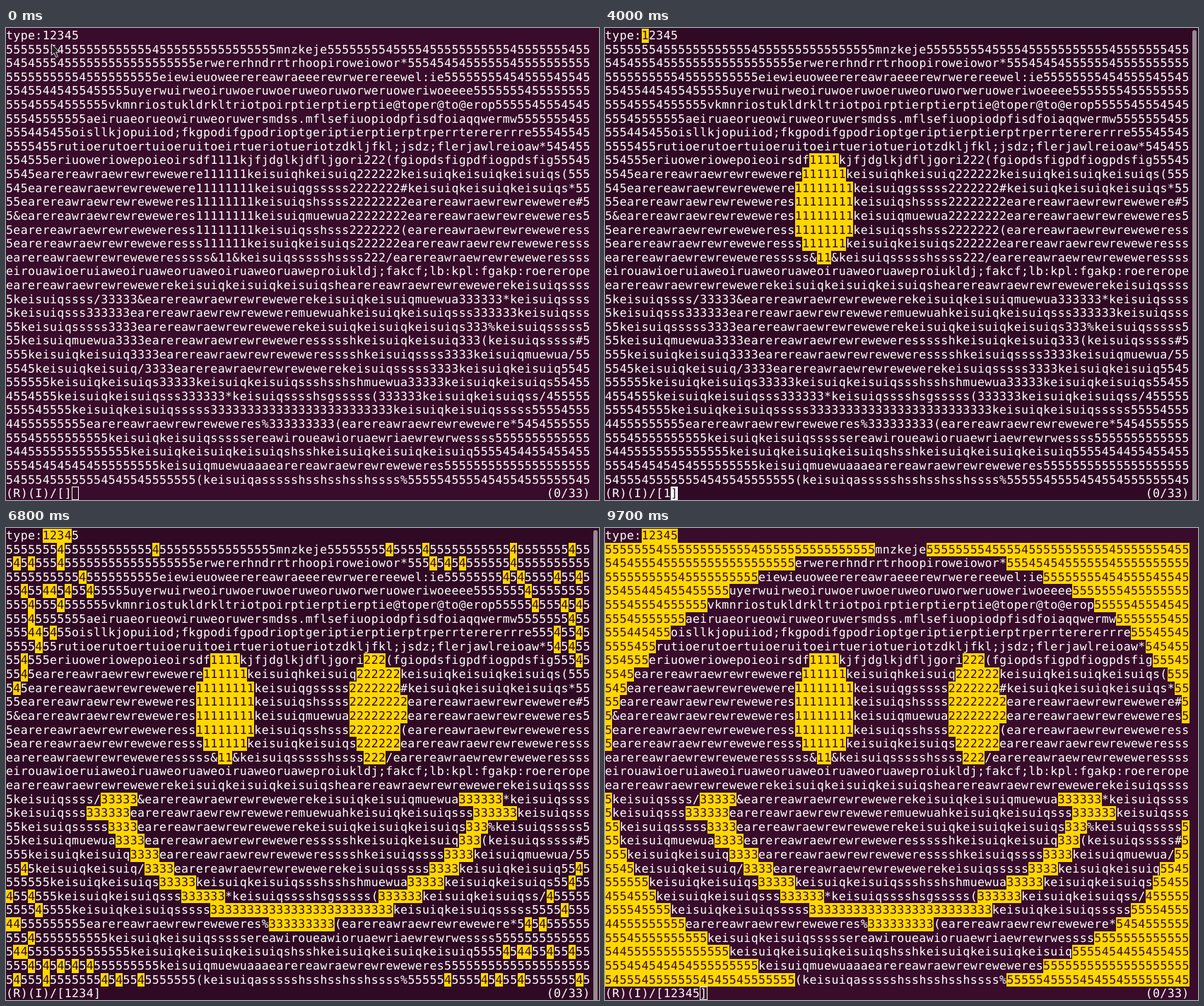
Animation of 839x667 px, one loop 9800 ms. Source, as an HTML page:

```html
<!DOCTYPE html>
<html lang="en">
<head>
<meta charset="utf-8">
<title>Incremental search</title>
<style>
  html, body { margin: 0; height: 100%; overflow: hidden; }
  body { --bg: #300a24; --row: 19.61px; position: relative; background: var(--bg); color: #fff; }
  body.idle { --bg: #380c2a; }
  pre, #cursor {
    position: absolute; margin: 0; top: 1px; left: 0;
    font: 16.53px/var(--row) "DejaVu Sans Mono", monospace;
    letter-spacing: calc(10.333px - 1ch);
    text-rendering: geometricPrecision;
    font-variant-ligatures: none;
  }
  #prompt, #cursor { top: calc(1px + 33 * var(--row)); }
  b { display: inline-block; height: var(--row); vertical-align: top; font-weight: inherit; }
  b.on { background: #ffd700; color: var(--bg); }
  #cursor { width: 10.333px; height: 19px; background: #fff; color: var(--bg); white-space: pre; }
  .idle #cursor { background: none; color: transparent; box-shadow: inset 0 0 0 1px #fff; }
  #bar { position: absolute; left: 831px; top: 3px; width: 6px; height: 670px; border-radius: 3px; background: #958a92; }
  .idle #bar { display: none; }
  #mouse { position: absolute; width: 14px; height: 22px; overflow: visible; }
</style>
</head>
<body>
<pre id="screen"></pre>
<pre id="prompt"></pre>
<div id="cursor"></div>
<div id="bar"></div>
<svg id="mouse"><path d="M.5 .5V16.5L4 13.2L6.6 19.5L9.3 18.3L6.7 12.3H11.6Z" fill="#222" stroke="#ddd"/></svg>
<script>
const text = `type:12345
5555555455555555555545555555555555555mnzkeje555555554555545555555555545555555455
54545554555555555555555555erwererhndrrtrhoopiroweiowor*5554545455555545555555555
555555555545555555555eiewieuoweerereawraeeerewrwerereewel:ie55555555454555545545
55455445455455555uyerwuirweoiruwoeruwoeruweoruworweruoweriwoeeee5555555455555555
55545554555555vkmnriostukldrkltriotpoirptierptierptie@toper@to@erop5555545554545
55545555555aeiruaeorueowiruweoruwersmdss.mflsefiuopiodpfisdfoiaqqwermw5555555455
555445455oisllkjopuiiod;fkgpodifgpodrioptgeriptierptierptrperrterererrre55545545
5555455rutioerutoertuioeruitoeirtueriotueriotzdkljfkl;jsdz;flerjawlreioaw*545455
554555eriuoweriowepoieoirsdf1111kjfjdglkjdfljgori222(fgiopdsfigpdfiogpdsfig55545
5545earereawraewrewrewewere111111keisuiqhkeisuiq222222keisuiqkeisuiqkeisuiqs(555
545earereawraewrewrewewere11111111keisuiqgsssss2222222#keisuiqkeisuiqkeisuiqs*55
55earereawraewrewreweweres11111111keisuiqshssss22222222earereawraewrewrewewere#5
5&earereawraewrewreweweres11111111keisuiqmuewua22222222earereawraewrewreweweres5
5earereawraewrewreweweress11111111keisuiqsshsss2222222(earereawraewrewreweweress
5earereawraewrewreweweresss111111keisuiqkeisuiqs222222earereawraewrewreweweresss
earereawraewrewreweweresssss&11&keisuiqssssshssss222/earereawraewrewreweweressss
eirouawioeruiaweoiruaweoruaweoiruaweoruaweproiukldj;fakcf;lb:kpl:fgakp:roererope
earereawraewrewrewewerekeisuiqkeisuiqkeisuiqshearereawraewrewrewewerekeisuiqssss
5keisuiqssss/33333&earereawraewrewrewewerekeisuiqkeisuiqmuewua333333*keisuiqssss
5keisuiqsss333333earereawraewrewreweweremuewuahkeisuiqkeisuiqsss333333keisuiqsss
55keisuiqsssss3333earereawraewrewrewewerekeisuiqkeisuiqkeisuiqs333%keisuiqsssss5
55keisuiqmuewua3333earereawraewrewreweweressssshkeisuiqkeisuiq333(keisuiqsssss#5
555keisuiqkeisuiq3333earereawraewrewreweweresssshkeisuiqssss3333keisuiqmuewua/55
5545keisuiqkeisuiq/3333earereawraewrewrewewerekeisuiqsssss3333keisuiqkeisuiq5545
555555keisuiqkeisuiqs33333keisuiqkeisuiqssshsshshmuewua33333keisuiqkeisuiqs55455
4554555keisuiqkeisuiqsss333333*keisuiqsssshsgsssss(333333keisuiqkeisuiqss/455555
555545555keisuiqkeisuiqsssss3333333333333333333333333keisuiqkeisuiqsssss55554555
44555555555earereawraewrewreweweres%333333333(earereawraewrewrewewere*5454555555
55545555555555keisuiqkeisuiqsssssereawiroueawioruaewriaewrewrwessss5555555555555
54455555555555555keisuiqkeisuiqkeisuiqshsshkeisuiqkeisuiqkeisuiq5555454455455455
555454545454555555555keisuiqmuewuaaaearereawraewrewreweweres55555555555555555555
54555455555554545545555555(keisuiqassssshsshsshsshssss%5555545555454554555555545`;

// Each row: start in ms, then what holds until the next row.
const cursorSteps = [[0, 9], [2100, null], [2400, 8], [4000, 9], [4600, 10], [5200, null], [5500, 11],
  [6100, 12], [6800, null], [7300, 13], [7900, null], [8500, 13], [9100, null], [9700, 13]];
const mouseSteps = [[0, [64, 22]], [1200, [130, 44]], [1300, [162, 53]], [2400, null],
  [8500, [166, 54]], [8600, [182, 50]], [8700, null]];
const keyTimes = [4000, 4600, 5500, 6100, 7300];

const $ = id => document.getElementById(id);
const at = (steps, t) => steps.findLast(([start]) => start <= t)[1];

$('screen').innerHTML = text.replace(/&/g, '&amp;').replace(/([1-5])\1*/g, '<b>$&</b>');
const runs = [...document.querySelectorAll('b')];
let typed = -1;

function frame(now) {
  const t = now % 9800;
  const count = keyTimes.filter(k => k <= t).length;
  const line = `(R)(I)/[${'12345'.slice(0, count)}]`;
  if (count !== typed) {
    typed = count;
    for (const run of runs) run.className = +run.textContent[0] <= count ? 'on' : '';
    $('prompt').textContent = line.padEnd(74) + '(0/33)';
  }
  document.body.className = t < 1500 || t >= 9700 ? 'idle' : '';

  const col = at(cursorSteps, t);
  $('cursor').hidden = col === null;
  $('cursor').style.left = col * 10.333 + 'px';
  $('cursor').textContent = line[col] || ' ';

  const tip = at(mouseSteps, t);
  $('mouse').style.display = tip ? '' : 'none';
  if (tip) $('mouse').style.translate = `${tip[0]}px ${tip[1]}px`;
  requestAnimationFrame(frame);
}
requestAnimationFrame(frame);
</script>
</body>
</html>
```
